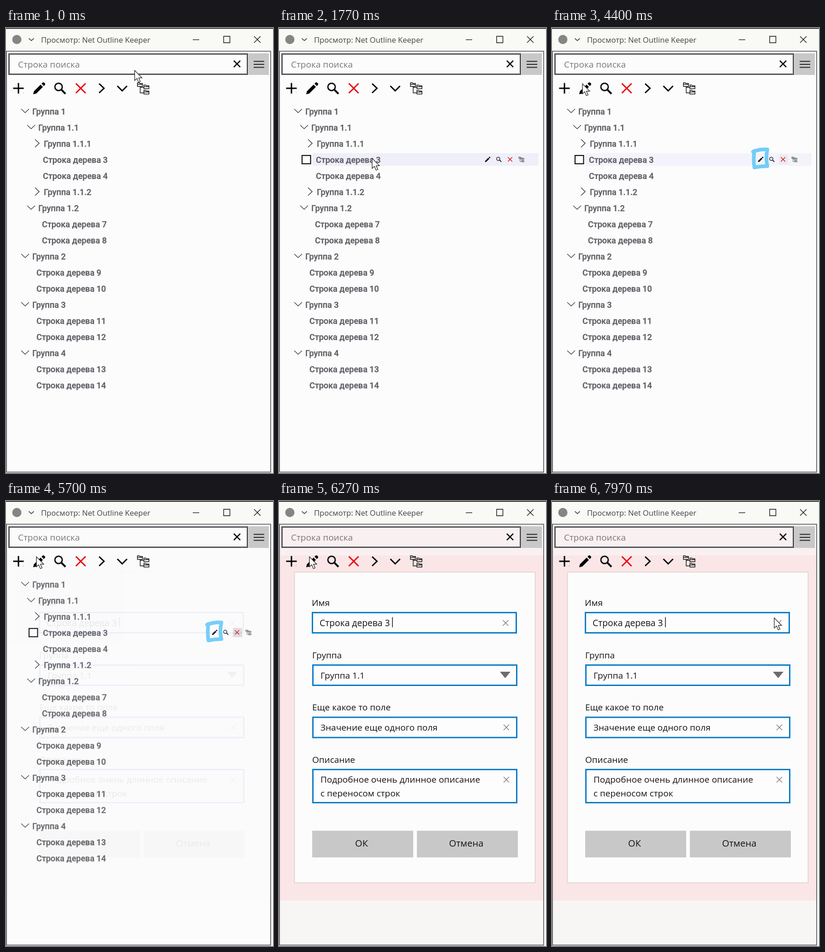
An HTML page for the animation above (8000 ms loop, 579 by 967 pixels).

```html
<!DOCTYPE html>
<html lang="ru">
<head>
<meta charset="utf-8">
<style>
  html, body { margin: 0; width: 100%; height: 100%; overflow: hidden; background: #fdfdfd; }
  svg { display: block; width: 100%; height: 100%; }
  text { font-family: "Open Sans", "Noto Sans", sans-serif; font-size: 19px; white-space: pre; }
  .tree text { font: 500 18px Roboto, sans-serif; fill: #606066; stroke: #606066; stroke-width: .4; }
  .line { fill: none; stroke: #111; }
</style>
</head>
<body>
<svg id="stage" viewBox="0 0 579 967" xmlns="http://www.w3.org/2000/svg"></svg>
<script>
const LOOP = 8000;
const stage = document.getElementById('stage');

const rect = (x, y, w, h, fill, extra = '') =>
  `<rect x="${x}" y="${y}" width="${w}" height="${h}" fill="${fill}" ${extra}/>`;
const line = (d, width = 1.5, color = '#111') =>
  `<path class="line" d="${d}" style="stroke:${color};stroke-width:${width}"/>`;
const text = (x, y, s, fill = '#141414', size = 19, extra = '') =>
  `<text x="${x}" y="${y}" fill="${fill}" style="font-size:${size}px" ${extra}>${s}</text>`;
const cross = (x, y, r, width, color) =>
  line(`M${x - r} ${y - r}l${2 * r} ${2 * r}m0 ${-2 * r}l${-2 * r} ${2 * r}`, width, color);
const group = (id, body, extra = '') => `<g id="${id}" ${extra}>${body}</g>`;
const at = (x, y, scale, body) => `<g transform="translate(${x} ${y}) scale(${scale})">${body}</g>`;

// Icons are centred on 0,0.
const folder = (x, y) => line(`M${x} ${y}h4l1.500 1.500h5.500v6.500h-11zM${x} ${y + 3.5}h11`, 1.4);
const icons = {
  plus: line('M-11.5 0h23M0 -11.5v23', 3, '#000'),
  pencil: '<path d="M-13 13l1.5-6.5L3-8 8-3-6.5 11.5zM5-10l2.5-2.5q1.5-1 3 0l2 2q1 1.5 0 3L10-5z"/>',
  search: '<circle class="line" cx="-3" cy="-3" r="8" stroke-width="3"/>' + line('M3 3l9 9', 4),
  remove: cross(0, 0, 10.5, 3, '#e8060d'),
  right: line('M-5 -10L5.500 0-5 10', 3, '#000'),
  down: line('M-10.500 -5L0 5.500 10.500 -5', 3, '#000'),
  tree: folder(-12, -12) + folder(2, -7) + folder(2, 4.5) + line('M-6 -4v14h8M-6 -2h8', 1.4)
};

function windowFrame() {
  return rect(0, 0, 579, 50, '#f9f9f6') + rect(0, 0, 579, 1.6, '#161616') +
    '<circle cx="23.500" cy="25" r="10" fill="#858585"/>' +
    line('M49.500 22.500l5.500 5 5.500-5', 1.8, '#555') +
    text(76, 32, 'Просмотр: Net Outline Keeper', '#444', 16.6) +
    line('M405 25.500h14', 1.3) + line('M472 18h13.500v14h-13.500z', 1.4) + cross(545, 25, 7, 1.4) +
    line('M0 50.500h574V965H1V50', 2, '#707070');
}

function toolbar() {
  const names = Object.keys(icons);
  return rect(6.5, 56.5, 517, 44, 'none', 'stroke="#58565b" stroke-width="3"') +
    text(26, 85.5, 'Строка поиска', '#777') + cross(501, 78, 7, 2.5) +
    rect(526, 55, 44, 47, '#c8c8c9') +
    line('M537 72.500h23m-23 6.500h23m-23 6.500h23', 2, '#222') +
    rect(36.5, 140, 1.5, 1.5, '#aaa') +
    group('pencilHover', rect(55, 114, 34, 35, '#dcd2d0')) +
    names.map((name, i) => at(27 + 45 * i, 131, 1, icons[name])).join('');
}

// Each row: text x, label, branch state.
const rows = [
  [57, 'Группа 1', 'open'], [70, 'Группа 1.1', 'open'], [82, 'Группа 1.1.1', 'closed'],
  [80, 3], [80, 4], [82, 'Группа 1.1.2', 'closed'],
  [70, 'Группа 1.2', 'open'], [78, 7], [78, 8],
  [57, 'Группа 2', 'open'], [66, 9], [66, 10],
  [57, 'Группа 3', 'open'], [66, 11], [66, 12],
  [57, 'Группа 4', 'open'], [66, 13], [66, 14]
];
function tree() {
  return rows.map(([x, label, state], i) => {
    const y = 181 + 35 * i;
    const mark = state === 'open' ? line(`M${x - 24} ${y - 5}l8.500 8 8.500-8`, 1.4, '#444')
      : state === 'closed' ? line(`M${x - 19} ${y - 9}l9 8.500-9 8.500`, 1.4, '#333') : '';
    const name = state ? label : `Строка дерева ${label}`;
    return mark + `<text x="${x}" y="${y + 6.5}">${name}</text>`;
  }).join('');
}

function rowTools() {
  const names = ['pencil', 'search', 'remove', 'tree'];
  return rect(50, 277, 18.5, 18, '#fdfdfd', 'stroke="#111" stroke-width="2.200"') +
    group('removeHover', rect(492, 276, 20, 20, '#dcdcde')) +
    names.map((name, i) => at(452.5 + 24.3 * i, 285.5, 0.45, icons[name])).join('');
}

const tint = () => rect(2, 51, 571, 67, '#f9f0f1') +
  rect(2, 118, 571, 750, '#fbe6e7') + rect(2, 868, 571, 96, '#f8f5f5');

function dialog() {
  const field = (x, y, h) =>
    rect(x + 1.5, y + 1.5, 442, h - 3, '#fdfdfd', 'stroke="#0c7bc8" stroke-width="3"');
  const button = (x, label) => rect(x, 716.5, 219, 58, '#c8c8c8') +
    text(x + 107, 751, label, '#141414', 20, 'text-anchor="middle"');
  return rect(33.5, 154.5, 522, 675, '#fcfcfc', 'stroke="#e2d6d4" stroke-width="2"') +
    text(71, 227.5, 'Имя') + field(71, 241, 47) + text(88, 271.5, 'Строка дерева 3', '#141414', 19.3) +
    line('M246 252.500v22', 1.5) + cross(491.5, 265, 6, 1.3, '#777') +
    text(72, 341.5, 'Группа') + field(72, 355, 47) + text(90, 385.5, 'Группа 1.1') +
    '<path d="M479 371h23l-11.500 14z" fill="#6c6c6c"/>' +
    text(72, 455, 'Еще какое то поле') + field(72, 468.5, 47) +
    text(90, 498.5, 'Значение еще одного поля') + cross(493, 492, 6, 1.3, '#777') +
    text(72, 568.5, 'Описание') + field(72, 582, 75) +
    text(90, 612, 'Подробное очень длинное описание') +
    text(90, 641.5, 'с переносом строк') + cross(493, 605.5, 6, 1.3, '#777') +
    button(72, 'ОК') + button(299, 'Отмена');
}

const ink = '<path id="inkLine" pathLength="100" fill="none" stroke="#72cdf7" stroke-width="8" ' +
  'stroke-linejoin="round" stroke-linecap="round" stroke-dasharray="100 120" ' +
  'd="M436 269Q450 263 467 264Q463 283 467 300Q453 300 439 303Q436 286 439 267"/>';
const arrow = '<path d="M0 0V22L5 17.500 8.500 26 12.200 24.500 8.700 16.300H15.700Z" ' +
  'fill="#fff" stroke="#222" stroke-width="1.300"/>';

stage.innerHTML = rect(0, 0, 579, 967, '#fcfcfd') + group('tint', tint()) + windowFrame() + toolbar() +
  group('rowBar', rect(73, 272, 490, 27.5, '#efeffa')) +
  group('tree', tree(), 'class="tree"') + group('rowTools', rowTools()) +
  group('dialog', dialog()) + group('ink', ink) + group('cursor', arrow);

// Plays a table of [ms, value, easing?]; the value before the first key holds from zero.
function play(id, prop, keys) {
  const frames = keys.map(([ms, value, easing = 'linear']) => ({ offset: ms / LOOP, [prop]: value, easing }));
  frames.unshift({ ...frames[0], offset: 0, easing: 'linear' });
  frames.push({ ...frames[frames.length - 1], offset: 1 });
  document.getElementById(id).animate(frames, { duration: LOOP, iterations: Infinity });
}
const fade = (id, ...keys) => play(id, 'opacity', keys);
const show = (id, on, off = LOOP) => fade(id, [on, 0], [on, 1], [off, 1], [off, 0]);
const pos = (x, y) => `translate(${x}px, ${y}px)`;

play('cursor', 'transform', [
  [30, pos(279, 92), 'ease-in-out'],
  [630, pos(201, 281)], [1100, pos(201, 281)],
  [1130, pos(203, 284)], [1300, pos(203, 284), 'ease-in-out'],
  [1630, pos(202, 283)], [2830, pos(202, 283), 'ease-in-out'],
  [3200, pos(66, 127)], [3630, pos(66, 121)],
  [7000, pos(66, 121), 'ease-in'],
  [7370, pos(230, 172), 'ease-out'], [7850, pos(482, 254)]
]);
fade('rowTools', [800, 0], [800, 1], [5700, 1], [5950, 0]);
fade('rowBar', [800, 0], [800, 1], [4270, 1], [4640, 0]);
fade('removeHover', [4270, 0], [4640, 1]);
play('inkLine', 'strokeDashoffset', [[3260, 110], [3870, 0]]);
fade('ink', [3260, 0], [3260, 1], [5680, 1], [6000, 0.5], [6160, 0]);
fade('dialog', [5675, 0], [6000, 0.9], [6060, 1]);
fade('tint', [5675, 0], [6000, 0.9], [6060, 1]);
show('pencilHover', 6600, 7130);
</script>
</body>
</html>
```
